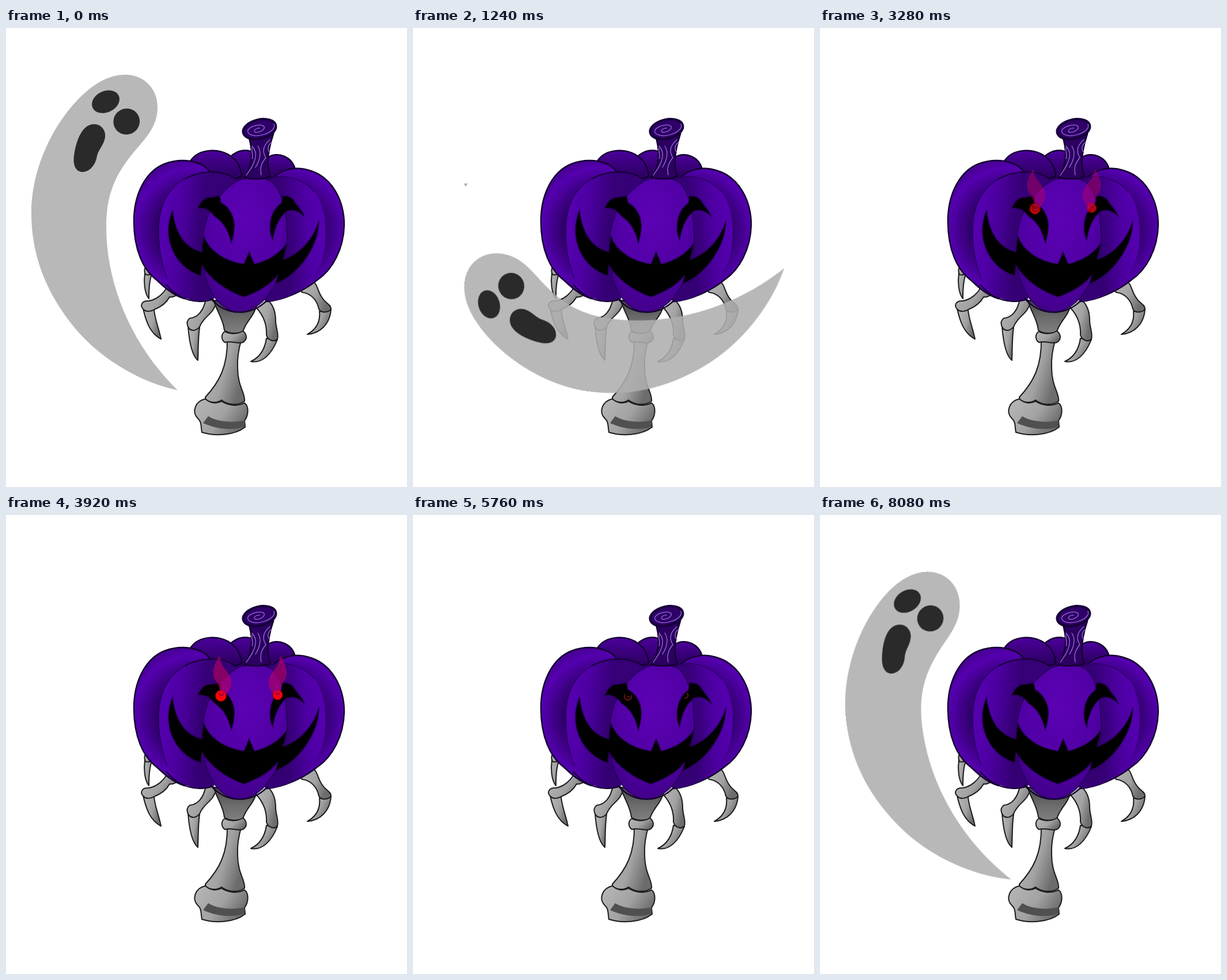
Write an HTML page without scripts that moves like this. It is 696 px wide and 797 px high and loops after 8.16 s.

```html
<!DOCTYPE html>
<html lang="en">
<head>
<meta charset="utf-8">
<title>Haunted pumpkin</title>
<style>
html, body { margin: 0; width: 100%; height: 100%; overflow: hidden; background: #fff; }
svg { display: block; width: 696px; height: 797px; }

.ghost { transform-origin: 351.3px 327.1px; animation: 8.16s linear infinite; }
.first { animation-name: orbit1, fade1; }
.second { animation-name: orbit2, fade2; }
.speck { animation: speck 8.16s step-end infinite; }
.dim { animation: dim 8.16s linear infinite; }
.bright { animation: bright 8.16s linear infinite; }
.flames { animation: burn 8.16s linear infinite; }
.flame { animation: flicker .582857s -.12s ease-in-out infinite; }

/* the orbit advances 6.5 degrees per 80 ms step */
@keyframes orbit1 {
  0% { rotate: 0deg; animation-timing-function: step-end; }
  .49% { rotate: 0deg; animation-timing-function: steps(16, start); }
  16.18% { rotate: 104deg; animation-timing-function: step-end; }
  91.17% { rotate: -65deg; animation-timing-function: steps(9, start); }
  100% { rotate: -6.5deg; }
}
@keyframes orbit2 {
  0% { rotate: -187deg; animation-timing-function: step-end; }
  .49% { rotate: -187deg; animation-timing-function: steps(26, start); }
  25.98%, 100% { rotate: -18deg; }
}
@keyframes fade1 {
  0%, 10.29% { opacity: 1; }
  15.1%, 91.17% { opacity: 0; }
  98.9%, 100% { opacity: 1; }
}
@keyframes fade2 {
  0%, 2.5% { opacity: 0; scale: 1; }
  10.29%, 20.1% { opacity: 1; scale: 1; }
  21.08% { opacity: .85; scale: .92; }
  25.9%, 100% { opacity: 0; scale: .85; }
}
@keyframes speck {
  0% { opacity: 0; }
  15.19% { opacity: 1; }
  16.18%, 100% { opacity: 0; }
}
@keyframes dim {
  0%, 22.06% { opacity: 0; }
  25.9%, 91.18% { opacity: 1; }
  97%, 100% { opacity: 0; }
}
@keyframes bright {
  0%, 37% { opacity: 0; }
  42.2%, 65.7% { opacity: 1; }
  70.5%, 100% { opacity: 0; }
}
@keyframes burn {
  0%, 37% { opacity: 0; }
  41.2%, 66.67% { opacity: 1; }
  70%, 100% { opacity: 0; }
}
@keyframes flicker {
  0%, 100% { d: path("M369 247C358 265 356 280 365 289C370 295 372 303 371 318C386 312 392 300 392 288C389 270 372 265 371 249Z"); }
  50% { d: path("M375 224C374 245 358 262 362 282C364 292 368 296 367 308C374 314 382 312 385 306C386 280 373 270 383 234Z"); }
}
</style>
</head>
<body>
<svg viewBox="0 0 696 797">
  <defs>
    <linearGradient id="bone" x2="1" y2=".5">
      <stop stop-color="#b8b8b8"/><stop offset=".6" stop-color="#a2a2a2"/><stop offset="1" stop-color="#6c6c6c"/>
    </linearGradient>
    <linearGradient id="palm" x2="0" y2="1">
      <stop stop-color="#4a4a4a"/><stop offset=".5" stop-color="#6a6a6a"/><stop offset="1" stop-color="#808080"/>
    </linearGradient>
    <radialGradient id="left" gradientUnits="userSpaceOnUse" cx="330" cy="350" r="120">
      <stop offset=".55" stop-color="#2d0065"/><stop offset=".78" stop-color="#480098"/><stop offset=".9" stop-color="#5500b0"/><stop offset="1" stop-color="#4a0098"/>
    </radialGradient>
    <radialGradient id="right" href="#left" cx="482"/>
    <linearGradient id="side" x2="1" y2=".15">
      <stop stop-color="#4a0098"/><stop offset=".1" stop-color="#5500b0"/><stop offset=".3" stop-color="#4d00a2"/><stop offset=".58" stop-color="#360076"/>
    </linearGradient>
    <linearGradient id="side2" href="#side" x1="1" x2="0"/>
    <radialGradient id="front" cx=".5" cy=".3" r=".75">
      <stop stop-color="#5c02b4"/><stop offset=".6" stop-color="#5000a4"/><stop offset="1" stop-color="#400086"/>
    </radialGradient>
    <linearGradient id="back" x2="0" y2="1">
      <stop stop-color="#4c009c"/><stop offset=".7" stop-color="#2d0063"/>
    </linearGradient>
    <filter id="soft" x="-50%" y="-20%" width="200%" height="140%"><feGaussianBlur stdDeviation="7"/></filter>

    <g id="ghost" opacity=".88">
      <path fill="#afafb0" d="M298 629C240 617 170 580 122 524C70 462 44 395 44 322C44 240 85 165 125 124C150 98 178 81 207 81C240 81 263 106 263 137C263 165 250 183 230 206C196 245 174 280 174 345C174 450 222 555 298 629Z"/>
      <g fill="#0d0d0d">
        <ellipse cx="173" cy="128" rx="25" ry="18.5" transform="rotate(-25 173 128)"/>
        <ellipse cx="209" cy="162.500" rx="23" ry="22.500" transform="rotate(-30 209 162)"/>
        <path d="M152 167C165 166 174 178 172 190C170 203 161 210 158 222C155 240 144 250 132 250C120 249 116 236 118 222C121 200 130 168 152 167Z"/>
      </g>
    </g>
    <path id="flame" class="flame" d="M369 247C358 265 356 280 365 289C370 295 372 303 371 318C386 312 392 300 392 288C389 270 372 265 371 249Z"/>
  </defs>

  <!-- skeleton hand -->
  <g fill="url(#bone)" stroke="#1c1c1c" stroke-width="2" stroke-linejoin="round">
    <path d="M241 426C239 440 240 460 248 470C248 450 249 438 253 428Z"/>
    <path d="M245 412C239 416 240 424 242 428C247 430 252 428 258 424Z"/>
    <path d="M238 487C243 510 250 530 269 540C265 520 258 505 257 489Z"/>
    <path d="M282 444C276 460 262 472 247 474C236 473 232 482 238 488C243 494 252 492 257 489C270 484 278 478 284 467C290 468 297 465 298 459L306 450Z"/>
    <path d="M316 518C318 545 322 568 333 577C334 560 333 540 336 520Z"/>
    <path d="M347 470C343 492 332 503 319 504C312 509 314 517 318 522C324 528 332 524 336 519C341 505 352 500 359 490L368 474Z"/>
    <path d="M452 539C449 560 440 572 425 579C445 583 461 566 471 541Z"/>
    <path d="M434 485C446 498 453 515 452 533C455 543 466 546 471 540C474 530 468 520 468 508C468 495 464 482 456 474C445 466 436 475 434 485Z"/>
    <path d="M544 492C546 510 539 523 523 532C545 530 562 515 564 489Z"/>
    <path d="M508 452L514 459C530 461 540 473 543 488C547 496 560 494 564 488C565 481 554 477 550 470C543 462 542 452 537 444L525 435Z"/>
    <path fill="url(#palm)" d="M361 474L436 478C431 502 415 510 411 528C400 531 388 531 379 525C377 505 367 495 361 474Z"/>
    <path d="M384 540C385 588 370 615 346 641C345 650 365 653 374 646C385 655 402 656 414 648C416 635 402 622 402 590C401 570 404 556 409 540Z"/>
    <path d="M380 527C388 532 402 532 411 526C419 532 419 541 411 546C401 549 390 542 380 546C373 541 373 531 380 527Z"/>
    <path d="M346 644C328 648 322 667 333 678C340 684 338 692 340 702C362 709 396 708 415 693L414 682C422 671 421 656 414 651C400 658 384 655 374 648C364 653 354 651 346 644Z"/>
    <path fill="#505050" stroke="none" d="M351 674C366 684 395 686 414 681L414 692C397 699 368 698 342 686Z"/>
  </g>

  <!-- pumpkin -->
  <g stroke="#14002f" stroke-width="2.500" stroke-linejoin="round">
    <path fill="url(#back)" d="M389 224C402 211 420 209 432 218L440 270H390Z"/>
    <path fill="url(#back)" d="M455 224C473 214 497 224 502 246L480 270H445Z"/>
    <path fill="url(#back)" d="M320 231C334 209 372 207 392 224C403 232 409 246 409 258L350 275Z"/>
    <path fill="url(#left)" d="M352 247C337 230 305 225 275 236C240 250 222 292 222 335C222 385 238 420 262 438C276 451 291 465 310 470L380 420Z"/>
    <path fill="url(#right)" d="M460 264C474 247 500 239 526 247C566 258 587 300 587 342C586 385 566 420 541 437C515 458 480 473 452 475L430 400Z"/>
    <g stroke="none">
      <path fill="url(#side)" d="M398 262C378 247 342 245 310 262C278 280 265 315 265 350C265 392 274 430 291 452C308 472 332 480 360 471L410 400Z"/>
      <path fill="url(#side2)" d="M455 264C474 252 512 258 535 284C556 310 560 360 549 400C538 437 505 471 452 475L420 400Z"/>
    </g>
    <path fill="none" stroke-width="2" d="M398 262C378 247 342 245 310 262M278 445C302 474 332 480 360 471"/>
    <path fill="none" stroke="#260058" stroke-width="1.200" d="M310 262C278 280 265 315 265 350C265 380 270 410 280 435M455 264C474 252 512 258 535 284"/>
    <path fill="url(#front)" stroke="#26005a" stroke-width="1.500" d="M398 268C410 259 448 258 462 268C482 287 488 328 488 370C485 425 452 493 405 493C362 491 341 440 340 385C340 330 365 288 398 268Z"/>
    <path fill="none" d="M355 469C380 500 426 502 454 472"/>
  </g>
  <g fill="none" stroke="#2b0063" stroke-width="12" opacity=".35" filter="url(#soft)">
    <path d="M342 310C330 350 332 420 352 462M494 310C502 350 494 420 470 458"/>
  </g>

  <!-- stem -->
  <path fill="#2b0061" stroke="#14002f" stroke-width="2.500" d="M421 188C429 213 428 238 414 260C427 263 445 263 459 258C450 235 456 208 464 184Z"/>
  <ellipse cx="440" cy="175.500" rx="29" ry="16.500" transform="rotate(-13 440 175.500)" fill="#2e0068" stroke="#170039" stroke-width="4"/>
  <g fill="none" stroke="#9a6dd8" stroke-width="1.300" stroke-linecap="round">
    <path d="M433 181C441 182 450 176 448 171C443 166 426 169 420 177C417 185 432 190 447 185C461 181 468 173 465 167M433 181C428 179 434 173 440 174"/>
    <path d="M427 205C433 212 436 220 430 234C427 243 421 249 417 256M427 208C425 215 430 219 427 227M458 194C446 204 444 214 451 225C444 234 440 242 443 255M460 199C453 206 454 212 458 217M437 205C445 217 439 232 433 242"/>
  </g>

  <!-- face -->
  <g stroke="#23004d" stroke-width="1.500">
    <path d="M333 313C338 300 347 293 356 294C361 294 366 291 371 292L373 303C389 312 398 330 396 349C395 362 393 367 391 374C387 354 378 337 362 327C354 316 344 311 333 313Z"/>
    <path d="M480 292C488 291 495 293 500 300C505 310 514 315 518 328C508 317 498 314 487 318C473 330 466 346 463 368C455 352 456 319 478 304Z"/>
    <path d="M289 316C294 360 312 382 340 389L343 361C353 388 380 405 413 410L422 389L431 410C455 404 475 392 488 373L481 402C510 393 535 365 543 334C543 375 513 425 468 444L472 428C462 443 440 457 413 467C385 457 358 440 340 412L338 430C292 415 270 365 289 316Z"/>
  </g>

  <!-- possessed eyes -->
  <g class="dim" fill="none" stroke="#641616" stroke-width="2">
    <path d="M368 311C365 318 370 322 375 321C379 319 380 316 379 313M372 314C373 317 376 317 376 315"/>
    <path d="M471 318C476 319 479 314 476 309"/>
  </g>
  <g class="bright">
    <g fill="#fa0505" stroke="#8d0000">
      <circle cx="373" cy="314" r="9.500"/><circle cx="471.500" cy="312.500" r="8.500"/>
    </g>
    <path fill="none" stroke="#7c0000" stroke-width="2" d="M370 309C371 315 377 314 377 309M469 308C470 313 475 312 475 308"/>
  </g>
  <g class="flames" fill="#c8005a" fill-opacity=".55">
    <use href="#flame"/>
    <use href="#flame" transform="translate(847) scale(-1 1)"/>
  </g>

  <use class="ghost first" href="#ghost"/>
  <use class="ghost second" href="#ghost"/>
  <path class="speck" fill="#afafb0" d="M88 270H95L91.500 275.500Z"/>
</svg>
</body>
</html>
```
